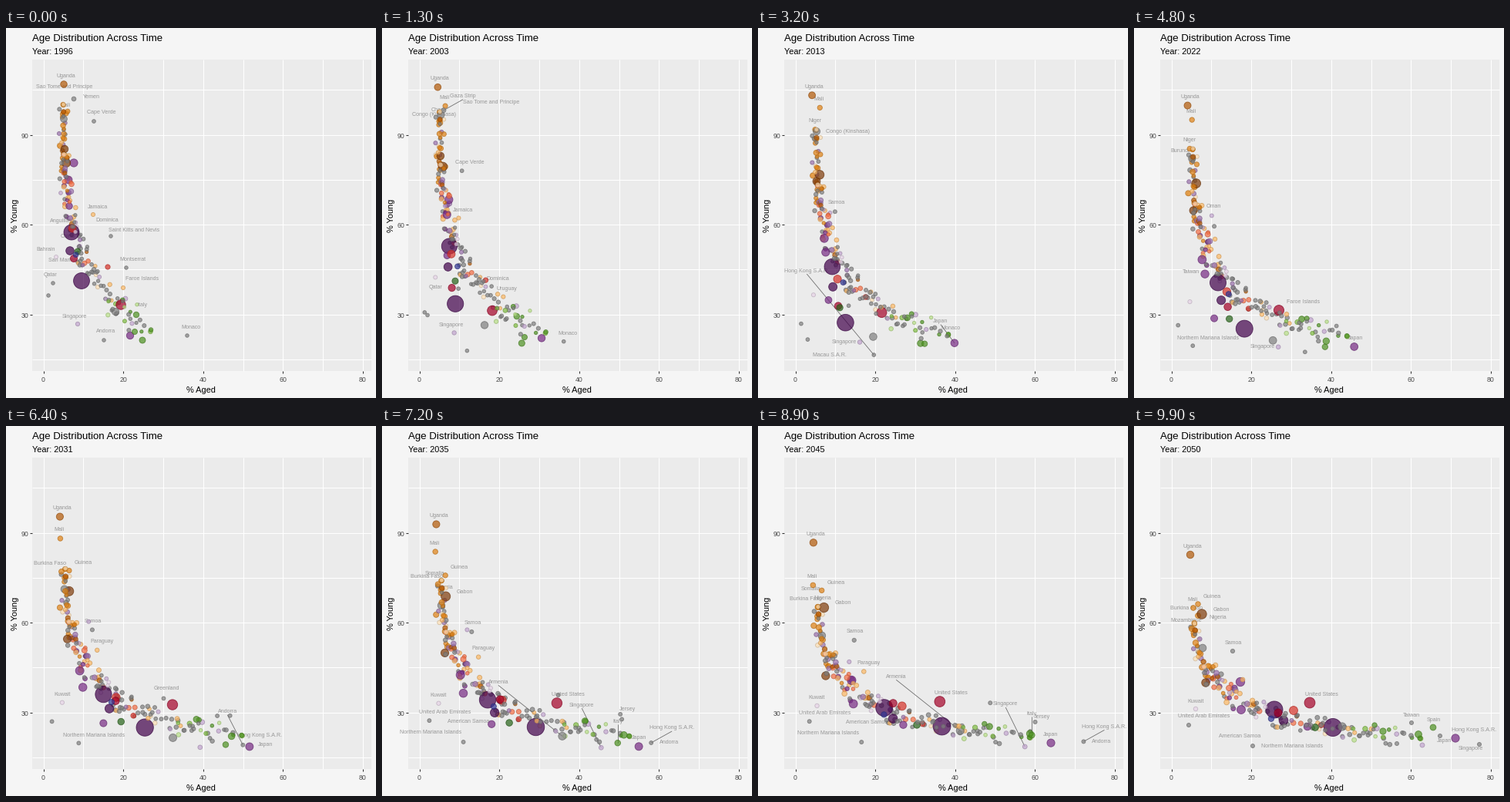
A matplotlib script for the animation above (10000 ms loop, 480 by 480 pixels).

```python
import numpy as np
import matplotlib.pyplot as plt
from matplotlib.animation import FuncAnimation
from matplotlib.colors import to_rgb

FRAMES, SIZE = 100, 480
PT = 0.72  # points per pixel at 100 dpi
U = np.linspace(0, 1, FRAMES)
PHASES = [0, 7, 23, 40, 56, 72, 90, FRAMES]  # labels are rearranged here
rng = np.random.default_rng(7)

plt.rcParams["font.family"] = "Liberation Sans"
fig = plt.figure(figsize=(4.8, 4.8), dpi=100, facecolor="#f5f5f5")
ax = fig.add_axes([0, 0, 1, 1])
ax.set(xlim=(0, SIZE), ylim=(SIZE, 0))
ax.axis("off")


def write(x, y, s, px, color="black", **kw):
    return ax.text(x, y, s, fontsize=px * PT, color=color, **kw)


def line(x, y, color, z=1, width=1.07):
    return ax.plot(x, y, color=color, lw=width * PT, zorder=z,
                   solid_capstyle="butt")[0]


# Panel, grid and axes
ax.add_patch(plt.Rectangle((34, 41), 440, 404, fc="#ebebeb", lw=0, zorder=0))
for v in range(0, 90, 10):
    x = 48.5 + 5.18 * v
    line([x, x], [41, 445], "white")
    if v % 20 == 0:
        line([x, x], [445, 448], "#333333")
        write(x, 459, v, 8.8, "#4d4d4d", ha="center")
for v in range(15, 106, 15):
    y = 488 - 3.883 * v
    line([34, 474], [y, y], "white")
    if v % 30 == 0:
        line([31, 34], [y, y], "#333333")
        write(29.5, y + 4, v, 8.8, "#4d4d4d", ha="right")
write(34, 17, "Age Distribution Across Time", 13.2)
write(253, 473, "% Aged", 11, ha="center")
write(12, 243, "% Young", 11, ha="center", va="center", rotation=90)
subtitle = write(34, 34, "", 11)

COLORS = dict(
    G="#7f7f7f", O="#e08214", B="#b35806", D="#7f3b08", L="#fdb863",
    Y="#fee0b6", P="#40004b", V="#762a83", M="#9970ab", N="#c2a5cf",
    W="#e7d4e8", C="#a50026", R="#d73027", T="#f46d43", U="#313695",
    F="#276419", H="#4d9221", I="#7fbc41", J="#b8e186")
MIXES = ["OOBLGYO", "OLGBGMYO", "OGBLGNMT", "GGMTLVGNWG",
         "GGGTMLGWBGU", "GGGGMNTLGYG", "GIHJGGIGNHG", "IGJHGIGLHG"]

paths, radii, hues, tags = [], [], [], []


def add(color, r, path):
    paths.append(path)
    radii.append(r)
    hues.append(to_rgb(COLORS[color]))


def crowd(count):
    """Countries sliding along the bend of the curve, youngest rank first."""
    width, top = 109 + 182 * U, 105 + 157 * U ** 1.4
    for rank in rng.random(count):
        mix = MIXES[int(np.clip(rank * 7 + rng.normal(0.5, 0.4), 0, 7))]
        color = rng.choice(list(mix))
        dx, dy = rng.normal(size=2).clip(-2, 2)
        x = 75 + 4 * U + width * rank ** (3 - 1.2 * U)
        y = top + (390 + 10 * U - top) * (1 - (1 - rank) ** (1.15 + 1.05 * U))
        spread = np.minimum(3.2 + 0.09 * (x - 72), 14)
        path = np.c_[np.maximum(x + spread * dx, 67),
                     np.minimum(y + 7 * dy, 419)]
        add(color, rng.uniform(2.2, 2.8 if color in "GWYJ" else 3.6), path)


def country(color, r, pts, *labels):
    """Smooth path through a few evenly timed points.

    Each label is (text, first phase, last phase, dx, dy).
    """
    pts = np.array(pts)
    t = np.linspace(0, 1, len(pts))
    fit = [np.polyval(np.polyfit(t, c, len(pts) - 1), U) for c in pts.T]
    for text, first, last, dx, dy in labels:
        art = write(0, 0, text, 7.1, "#989898", ha="center", va="center",
                    zorder=3)
        far = np.hypot(dx, dy) > 27 and abs(dy) > 15
        leader = line([], [], "#6a6a6a", 4, 0.8) if far else None
        span = range(PHASES[first], PHASES[last + 1])
        tags.append((art, leader, len(paths), span, np.array([dx, dy])))
    add(color, r, np.c_[fit[0], fit[1]])


crowd(110)

# Asia
country("P", 10.5, [(85, 265), (97, 311), (129, 350), (182, 368)],
        ("Anguilla", 0, 0, -15, -14), ("China", 0, 0, -5, 6))
country("P", 11, [(98, 328), (115, 383), (185, 391), (258, 391)])
country("V", 4.9, [(161, 399), (257, 409), (320, 416), (417, 405)],
        ("Japan", 2, 2, -18, -28), ("Japan", 3, 3, 2, -11),
        ("Japan", 4, 4, 21, -2), ("Japan", 5, 5, 0, -11),
        ("Japan", 6, 6, -14, 3))
country("P", 5.6, [(83, 289), (98, 337), (137, 368), (194, 382)])
country("V", 5.4, [(88, 175), (86, 275), (97, 319), (138, 332)],
        ("Taiwan", 3, 3, -14, 16))
country("V", 5.2, [(81, 197), (88, 293), (101, 341), (139, 368)])
country("V", 4.5, [(82, 231), (92, 355), (130, 386), (225, 390)])
country("N", 2.5, [(71, 214), (94, 240), (108, 256), (124, 346)],
        ("Oman", 3, 3, 2, -12))
country("W", 2.6, [(65, 297), (72, 347), (73, 359), (80, 367)],
        ("San Marino", 0, 0, 8, 5), ("Bahrain", 0, 0, -13, -9),
        ("Qatar", 1, 1, 0, 13), ("Kuwait", 4, 6, 0, -10))
country("N", 2.8, [(93, 384), (135, 408), (260, 417), (374, 414)],
        ("Singapore", 0, 1, -4, -10), ("Singapore", 2, 3, -20, 0),
        ("Singapore", 5, 5, -25, -55))
country("G", 2.4, [(127, 405), (154, 424), (318, 413), (448, 413)],
        ("Andorra", 0, 0, 3, -11), ("Macau S.A.R.", 2, 2, -57, 0),
        ("Hong Kong S.A.R.", 2, 2, -87, -109),
        ("Andorra", 4, 4, -20, -43), ("Hong Kong S.A.R.", 4, 4, 22, -12),
        ("Hong Kong S.A.R.", 5, 5, 27, -19), ("Andorra", 5, 5, 23, 0),
        ("Hong Kong S.A.R.", 6, 6, -7, -19), ("Singapore", 6, 6, -11, 5))

# Americas
country("C", 6.6, [(149, 359), (162, 369), (219, 361), (228, 359)],
        ("Faroe Islands", 3, 3, 32, -11), ("Greenland", 4, 4, -8, -21),
        ("United States", 5, 6, 15, -11))
country("R", 5.2, [(86, 260), (104, 327), (146, 353), (207, 369)])
country("C", 4.8, [(88, 299), (105, 361), (145, 356), (187, 372)])
country("R", 3.3, [(132, 310), (140, 350), (168, 377), (243, 388)])
country("L", 2.7, [(113, 242), (97, 260), (120, 293), (141, 329)],
        ("Jamaica", 0, 1, 6, -10), ("Paraguay", 4, 5, 6, -11))
country("L", 2.7, [(152, 337), (160, 363), (188, 380), (308, 393)],
        ("Faroe Islands", 0, 0, 25, -11), ("Uruguay", 1, 1, 5, -10))
country("G", 2.4, [(156, 311), (121, 361), (284, 377), (341, 412)],
        ("Montserrat", 0, 0, 8, -10))
country("G", 2.4, [(136, 270), (154, 371), (210, 352), (360, 385)],
        ("Saint Kitts and Nevis", 0, 0, 30, -7), ("Dominica", 0, 0, -5, -20),
        ("Dominica", 1, 1, 8, -10), ("Taiwan", 6, 6, 0, -10))

# Europe
country("G", 4.9, [(142, 368), (151, 401), (221, 404), (270, 390)],
        ("Armenia", 5, 5, -83, -70))
country("H", 4.2, [(177, 405), (213, 409), (298, 402), (369, 400)])
country("H", 3.9, [(169, 372), (195, 376), (251, 381), (323, 396)],
        ("Italy", 0, 0, 8, -13))
country("H", 3.7, [(167, 394), (218, 410), (290, 413), (388, 391)],
        ("Italy", 5, 5, 0, -28), ("Spain", 6, 6, 1, -10))
country("F", 4.2, [(93, 290), (107, 364), (153, 384), (235, 391)])
country("G", 2.4, [(235, 399), (246, 399), (295, 375), (397, 402)],
        ("Monaco", 0, 2, 5, -10), ("Jersey", 5, 5, 9, -6))

# Africa
country("B", 4.5, [(75, 73), (70, 88), (70, 120), (73, 167)],
        ("Uganda", 0, 6, 3, -11))
country("O", 3.2, [(78, 111), (80, 104), (70, 150), (77, 236)],
        ("Mali", 0, 6, -1, -11), ("Sao Tome and Principe", 1, 1, 60, -5))
country("O", 3.3, [(75, 137), (74, 133), (72, 193), (83, 246)],
        ("Niger", 2, 3, 0, -11), ("Burundi", 3, 3, -13, 3),
        ("Burkina Faso", 4, 6, -15, -10))
country("O", 3.1, [(80, 108), (81, 165), (82, 189), (83, 231)],
        ("Guinea", 4, 6, 18, -10), ("Somalia", 5, 5, -14, -2))
country("O", 3.5, [(70, 153), (71, 193), (70, 238), (75, 263)],
        ("Mozambique", 6, 6, -7, -11))
country("D", 5.9, [(78, 175), (80, 191), (82, 216), (88, 244)],
        ("Nigeria", 5, 5, -2, -12), ("Nigeria", 6, 6, 21, 4),
        ("Gabon", 5, 6, 25, -6))
country("D", 5, [(76, 157), (76, 201), (80, 281), (93, 333)])
country("G", 4.6, [(75, 118), (76, 136), (76, 217), (89, 288)],
        ("Congo (Kinshasa)", 1, 1, -9, 0), ("Congo (Kinshasa)", 2, 2, 40, 0))

# Outliers
country("G", 3, [(88, 92), (73, 146), (79, 235), (113, 322)],
        ("Yemen", 0, 0, 23, -3), ("Sao Tome and Principe", 0, 0, -12, -16),
        ("Gaza Strip", 1, 1, 25, -18), ("Chad", 1, 1, -8, 0))
country("G", 2.5, [(114, 121), (100, 240), (113, 265), (128, 292)],
        ("Cape Verde", 0, 1, 10, -11), ("Samoa", 2, 2, 2, -12),
        ("Samoa", 4, 6, 1, -11))
country("G", 2.4, [(55, 347), (56, 384), (60, 383), (71, 388)],
        ("United Arab Emirates", 5, 6, 20, -11))
country("G", 2.4, [(61, 331), (65, 405), (97, 411), (154, 415)],
        ("Qatar", 0, 0, -3, -10),
        ("Northern Mariana Islands", 3, 4, 20, -10),
        ("Northern Mariana Islands", 5, 5, -43, -12),
        ("Northern Mariana Islands", 6, 6, 51, 0),
        ("American Samoa", 5, 5, 7, -26), ("American Samoa", 6, 6, -17, -13))

crowd(55)

paths, radii, hues = np.array(paths), np.array(radii), np.array(hues)
marks = ax.scatter(*paths[:, 0].T, c=hues, alpha=0.7, edgecolors=hues * 0.8,
                   linewidths=0.9 * PT, zorder=5)


def update(i):
    subtitle.set_text(f"Year: {1996 + round(54 * U[i])}")
    marks.set_offsets(paths[:, i])
    marks.set_sizes((2 * PT * radii * (0.95 + 0.1 * U[i])) ** 2)
    for art, leader, k, span, shift in tags:
        spot = paths[k, i] + shift
        art.set_visible(i in span)
        art.set_position(spot)
        if leader:
            leader.set_visible(i in span)
            leader.set_data(*np.transpose([spot + (0, 4), paths[k, i]]))
    return []


anim = FuncAnimation(fig, update, frames=FRAMES, interval=100, repeat=True,
                     repeat_delay=0, init_func=lambda: update(0))
plt.show()
```
